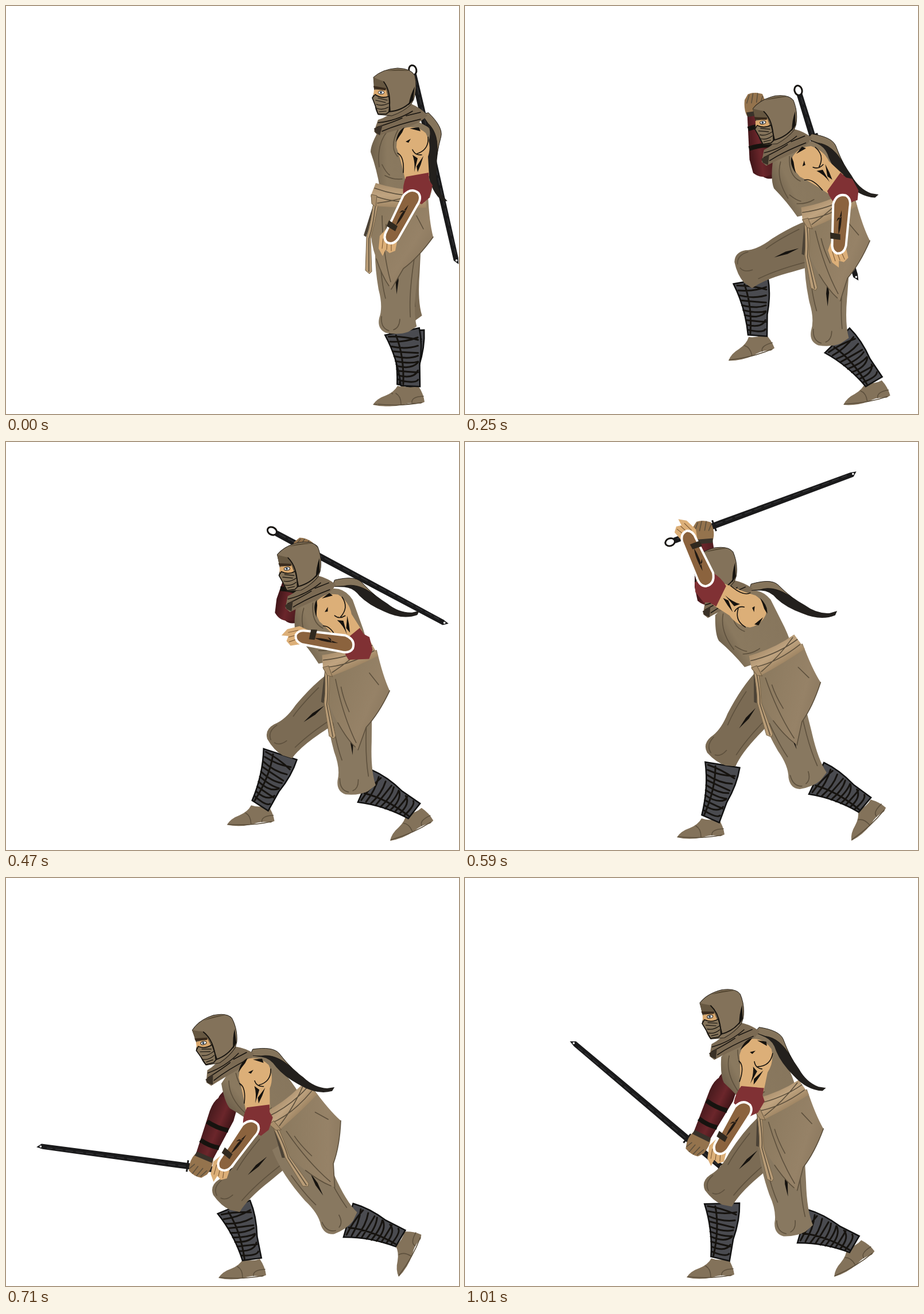
An HTML page that plays this animation: 789x710 px, repeating every 1.07 s.

```html
<!DOCTYPE html>
<html lang="en">
<head>
<meta charset="utf-8">
<title>Sword draw</title>
<style>
html, body { margin: 0; width: 100%; height: 100%; overflow: hidden; background: #fff; }
svg { display: block; }
.ink { fill: none; stroke: #16130f; stroke-linecap: round; stroke-linejoin: round; }
.fold { fill: none; stroke: #5d503d; stroke-width: 1.6; stroke-linecap: round; }
</style>
</head>
<body>
<svg width="789" height="710" viewBox="0 0 789 710">
<defs>
  <linearGradient id="cloth">
    <stop offset="0" stop-color="#6f614c"/><stop offset=".25" stop-color="#8a795f"/><stop offset="1" stop-color="#87765d"/>
  </linearGradient>
  <linearGradient id="hem" x2="1" y2="1">
    <stop offset="0" stop-color="#88775c"/><stop offset=".6" stop-color="#968267"/><stop offset="1" stop-color="#7d6c54"/>
  </linearGradient>
  <linearGradient id="sash" x2="0" y2="1">
    <stop offset="0" stop-color="#a88d6b"/><stop offset=".5" stop-color="#c0a480"/><stop offset="1" stop-color="#a08664"/>
  </linearGradient>
  <linearGradient id="sleeve" x2="0" y2="1">
    <stop offset="0" stop-color="#3f1518"/><stop offset=".45" stop-color="#6b262b"/><stop offset="1" stop-color="#471a1d"/>
  </linearGradient>
  <g id="thigh">
    <path d="M642 390Q636 435 650 495Q660 525 654 545Q651 564 667 570Q690 573 706 566L720 556Q712 530 716 480L720 400L712 385Z"/>
    <path class="fold" d="M658 542Q657 562 672 566M690 545Q690 560 680 564M709 440Q703 500 708 540M650 445Q655 485 663 510"/>
    <path d="M681 456L684 478L682 502L679 480Z" fill="#16130f"/>
  </g>
  <g id="shin">
    <path d="M664 571L724 561Q729 590 722 625L721 663L688 660Q684 612 664 571Z" fill="#4a4b50" stroke="#111" stroke-width="2.5"/>
    <path id="wraps" class="ink" stroke-width="3"/>
  </g>
  <g id="foot">
    <path d="M689 661Q705 666 718 661Q727 674 729 689L722 692Q706 688 691 694Q668 699 646 694Q653 683 668 678Q683 672 689 661Z" fill="#83725a"/>
    <path class="fold" d="M679 674Q688 679 688 693M707 690Q706 680 727 679M648 693Q690 697 724 690"/>
  </g>
</defs>

<g id="sword">
  <ellipse cx="-61" rx="8.5" ry="6.5" class="ink" stroke-width="3"/>
  <path d="M-53 -5L35 -5.5L275 -4L286 -2L278 5L35 5.5L-53 5Z" fill="#1a1a1b"/>
  <path d="M-48 -1H268" stroke="#2e2e30" stroke-width="2" stroke-dasharray="13 5"/>
  <path d="M21 -10V10" stroke="#1a1a1b" stroke-width="3"/>
  <circle cx="279" r="1.8" fill="#fff"/>
</g>
<rect id="upperB" x="-8" y="-20" width="94" height="40" rx="18" fill="url(#sleeve)"/>
<g id="foreB">
  <path d="M94 -17Q106 -21 122 -17L131 -10Q134 2 128 15L117 18Q103 20 94 14Z" fill="#94734d"/>
  <path class="fold" d="M116 -14L129 -8M115 -6L131 -1M115 3L130 7M114 10L124 15"/>
  <path d="M-6 -20Q-22 -5 -10 16Q0 23 18 22L96 15V-16L18 -23Z" fill="url(#sleeve)"/>
  <path class="ink" stroke-width="8" style="stroke-linecap:butt" d="M37 -21Q41 0 37 19M71 -18Q75 0 71 17"/>
  <path d="M92 -16L100 -17V16L92 15Z" fill="#39322a"/>
</g>
<g fill="#7b6b54">
  <use id="footB" href="#foot"/><use id="shinB" href="#shin"/><use id="thighB" href="#thigh"/>
</g>
<g fill="#887860">
  <use id="footF" href="#foot"/><use id="shinF" href="#shin"/><use id="thighF" href="#thigh"/>
</g>
<g id="skirt">
  <path d="M640 345L623 399L627 402L645 352Z" fill="#4b4236"/>
  <path d="M642 335L735 328Q737 375 744 402Q718 438 692 457L671 493Q655 470 645 440Q634 410 636 385Z" fill="url(#hem)"/>
  <path class="fold" d="M744 402Q718 438 692 457L671 493M655 365Q656 430 670 480M715 365L727 388M662 380Q662 400 668 425M645 440Q655 470 667 487"/>
  <path d="M640 342Q636 375 628 402L626 460L633 466L637 462L635 405Q643 375 648 346Z" fill="#b89c77" stroke="#766449"/>
  <path class="fold" d="M643 350Q639 385 632 405L632 462"/>
</g>
<g id="torso">
  <path d="M652 212Q635 240 635 254Q646 285 651 316L738 334Q744 315 746 290L749 237Q746 219 734 210L712 198L680 204Z" fill="url(#cloth)"/>
  <path class="fold" d="M683 215Q667 245 682 262M665 217Q645 240 650 280M660 295Q675 303 690 301M655 276Q662 290 668 294"/>
</g>
<g id="belt">
  <path d="M647 308Q690 322 733 320L735 351Q690 352 645 348L638 331Z" fill="url(#sash)"/>
  <path class="fold" stroke-width="1" d="M645 317Q690 333 733 330M641 329Q680 345 732 340M650 343Q690 338 728 323"/>
  <path d="M639 328L649 330L647 350L640 344Z" fill="#a98e6b" stroke="#6f5d44"/>
</g>
<g id="tail">
  <path d="M0 -6Q30 -25 45 -18Q70 -4 100 3Q125 12 146 4L157 -3L156 5Q135 22 100 18Q70 16 50 6Q35 -4 20 0L0 6Z" fill="#23201d"/>
  <path d="M0 -6Q30 -25 45 -18Q60 -10 76 -3Q40 -16 18 -1L0 6Z" fill="#85745b" stroke="#16130f" stroke-width=".8"/>
</g>
<g id="head">
  <path d="M705 170Q722 177 734 190Q724 203 698 211Q668 219 648 226L641 218L648 198Q668 192 680 178Z" fill="#7b6a53"/>
  <path class="ink" stroke-width="1.5" d="M648 203Q680 200 708 183M646 211Q675 202 690 195M655 218Q682 206 722 197M697 191L722 185"/>
  <path d="M641 213L656 207L651 225L643 220Z" fill="#3a3127"/>
  <path d="M640 124Q655 110 682 108Q706 109 712 121Q717 142 710 163L705 172Q692 184 672 191L648 189Q643 180 643 172L638 160L642 150L641 134Z" fill="#83725a" stroke="#2a241c"/>
  <path d="M640 124Q651 129 658 131Q666 142 667 160L661 148L641 144Z" fill="#665741"/>
  <path d="M641 146L662 145L665 160L651 161L640 155Z" fill="#dba96e"/>
  <path d="M640 139L662 143L661 147L641 144Z" fill="#3a2b1d"/>
  <ellipse cx="653.5" cy="150.5" rx="5" ry="2.8" fill="#fff" stroke="#16130f"/>
  <circle cx="653" cy="150.5" r="2" fill="#345"/>
  <path d="M638 160L643 154Q654 162 667 157L669 183L662 188H648L643 173Z" fill="#84735a" stroke="#16130f" stroke-width="1.6"/>
  <path class="ink" stroke-width="1.2" d="M644 164L661 168M645 171Q655 175 667 169M646 178Q656 182 666 176M650 184L662 183M648 160L664 164"/>
  <path class="ink" stroke-width="1.8" d="M658 132Q672 150 667 184M667 184Q690 182 705 167"/>
  <path d="M712 140L709 164L701 173Q704 155 712 140Z" fill="#16130f"/>
  <path d="M662 113Q685 108 703 113Q685 112 662 113Z" fill="#51442f"/>
</g>
<g id="upperF">
  <path d="M690 214Q712 205 731 221Q742 242 735 262L737 296L695 301Q688 268 680 246Q680 225 690 214Z" fill="#dcaf78"/>
  <path class="ink" stroke-width="1.6" d="M735 228Q737 250 716 257M682 256Q694 262 692 290M708 250Q712 260 724 259"/>
  <path d="M679 237Q682 217 694 211L690 220Q684 228 679 237ZM703 213L719 211L722 218ZM696 236L705 231L701 238ZM708 259L717 265L711 289Q713 272 708 259ZM727 261Q723 276 717 289L715 279Z" fill="#16130f"/>
  <path d="M697 297L736 290L737 303L743 312L737 334L724 345L692 329Q690 313 697 297Z" fill="#803134"/>
</g>
<g id="foreF">
  <path d="M668 384L651 402L649 424L656 437L661 426L668 432L678 428L683 402L680 388Z" fill="#dcaf78"/>
  <path class="ink" style="stroke:#725130" d="M657 407L655 424M664 412L663 426M671 415L671 428"/>
  <path d="M692 332Q705 317 718 327Q725 336 716 349L683 407Q674 419 663 413Q656 405 663 393Z" fill="#8b633e" stroke="#fff" stroke-width="4"/>
  <path d="M701 348Q686 364 679 384Q690 374 701 348ZM689 358L698 357L685 362Z" fill="#211a14"/>
  <path d="M667 375L682 385L678 394L663 385Z" fill="#30291f"/>
</g>
</svg>
<script>
// Arms hold [upper, fore] angles; toe is the planted front foot, step the other ankle.
const poses = [
  { at: 0, root: [685, 330], lean: 0, toe: 646, step: [697, 662], arm: [0, 0], swordArm: [88, 95] },
  { at: 2, root: [655, 342], lean: -13, toe: 651, step: [607, 590], arm: [-22, -17], swordArm: [119, 221] },
  { at: 5, root: [632, 351], lean: -25, toe: 659, step: [509, 574], arm: [-44, -24], swordArm: [172, 262] },
  { at: 11, root: [597, 373], lean: -23, toe: 669, step: [442, 633], arm: [-29, 71], swordArm: [176, 284] },
  { at: 15, root: [541, 368], lean: -30, toe: 673, step: [427, 656], arm: [126, 128], swordArm: [200, 265] },
  { at: 19, root: [494, 395], lean: -41, toe: 684, step: [428, 664], arm: [3, 8], swordArm: [132, 113] },
  { at: 23, root: [548, 383], lean: -28, toe: 643, step: [444, 663], arm: [15, 3], swordArm: [134, 116] }
];
const grabStart = 5, grabEnd = 11, lastFrame = 23;
const rad = Math.PI / 180;
const el = id => document.getElementById(id);
const clamp01 = v => Math.min(1, Math.max(0, v));
const mix = (a, b, t) => Array.isArray(a) ? a.map((v, i) => mix(v, b[i], t)) : a + (b - a) * t;
const heading = ([x1, y1], [x2, y2]) => Math.atan2(y2 - y1, x2 - x1) / rad;

function offset([x, y], angle, dx, dy = 0) {
  const c = Math.cos(angle * rad), s = Math.sin(angle * rad);
  return [x + dx * c - dy * s, y + dx * s + dy * c];
}

function place(id, [x, y], angle, pivotX = 0, pivotY = 0) {
  el(id).setAttribute('transform', `translate(${x} ${y}) rotate(${angle}) translate(${-pivotX} ${-pivotY})`);
}

function poseAt(frame) {
  const next = Math.max(1, poses.findIndex(p => p.at >= frame));
  const a = poses[next - 1], b = poses[next], t = (frame - a.at) / (b.at - a.at);
  return Object.fromEntries(Object.keys(a).map(k => [k, mix(a[k], b[k], t)]));
}

// Two-bone leg: the knee always bends forward.
function placeLeg(side, hip, ankle, pitch, thigh, shin) {
  const reach = Math.hypot(ankle[0] - hip[0], ankle[1] - hip[1]);
  const bend = Math.acos(Math.min(1, (thigh ** 2 + reach ** 2 - shin ** 2) / (2 * thigh * reach))) / rad;
  const angle = heading(hip, ankle) + bend, knee = offset(hip, angle, thigh);
  place('thigh' + side, knee, angle - 88, 688, 555);
  place('shin' + side, ankle, heading(knee, ankle) - 81.5, 704, 662);
  place('foot' + side, ankle, pitch, 704, 662);
}

function draw(frame) {
  const { root, lean, toe, step, arm, swordArm } = poseAt(frame);

  // The spine curls further with each joint away from the hips.
  const spine = 1 + lean * .0036;
  const shoulder = offset(root, lean * 1.5, 23 * spine, -93 * spine);
  const neck = offset(shoulder, lean, -18, -47), nod = lean * .35;
  place('skirt', root, -lean * lean / 50, 685, 330);
  place('belt', root, lean * 1.1, 688, 330);
  place('torso', shoulder, lean, 708, 237);
  place('head', neck, nod, 690, 190);
  place('tail', offset(neck, nod, 40, -3), 16 + .31 * (frame - 14) ** 2);

  place('upperF', shoulder, arm[0], 708, 237);
  place('foreF', offset(shoulder, arm[0], 9, 79), arm[1], 717, 318);
  const elbow = offset(shoulder, swordArm[0], 77);
  const hand = offset(elbow, swordArm[1], 116);
  place('upperB', shoulder, swordArm[0]);
  place('foreB', elbow, swordArm[1]);

  // The sword leaves the back, then follows the wrist.
  const grab = clamp01((frame - grabStart) / (grabEnd - grabStart));
  const swing = clamp01((frame - grabEnd) / (lastFrame - grabEnd));
  const wrist = -256 - 34 * Math.sin(Math.PI * swing);
  const sheath = [shoulder[0] + 14 + lean * .5, shoulder[1] - 66];
  place('sword', mix(sheath, hand, grab), mix(77 + lean * .17, swordArm[1] + wrist, grab));

  const hip = [root[0] + 2, root[1] + 54];
  const heelLift = Math.min(0, (hip[0] - toe) * .31);
  placeLeg('F', hip, offset([toe, 694], heelLift, 58, -32), heelLift, 171, 109);
  placeLeg('B', hip, step, Math.min(0, (step[1] - 640) * .18), 154, 115);
}

// Bandage strips with seeded slants.
let seed = 7;
const random = () => (seed = seed * 16807 % 2147483647) / 2147483647;
let strips = 'M683 572Q696 610 692 658';
for (let i = 0; i < 10; i++) {
  const y = 574 + i * 8.6, left = 670 + i * 2.1;
  strips += `M${left} ${y}Q${left + 25} ${y + 9 * random()} ${721 - i * .3} ${y - 9 + 18 * random()}`;
}
el('wraps').setAttribute('d', strips);

function frameAt(ms) {
  if (ms < 350) return Math.floor(ms / 50);
  if (ms < 710) return 7 + Math.floor((ms - 350) / 30);
  return ms < 830 ? 19 : 20 + Math.floor((ms - 830) / 60);
}

let start;
function tick(now) {
  start ??= now;
  draw(frameAt((now - start) % 1070));
  requestAnimationFrame(tick);
}
draw(0);
requestAnimationFrame(tick);
</script>
</body>
</html>
```
